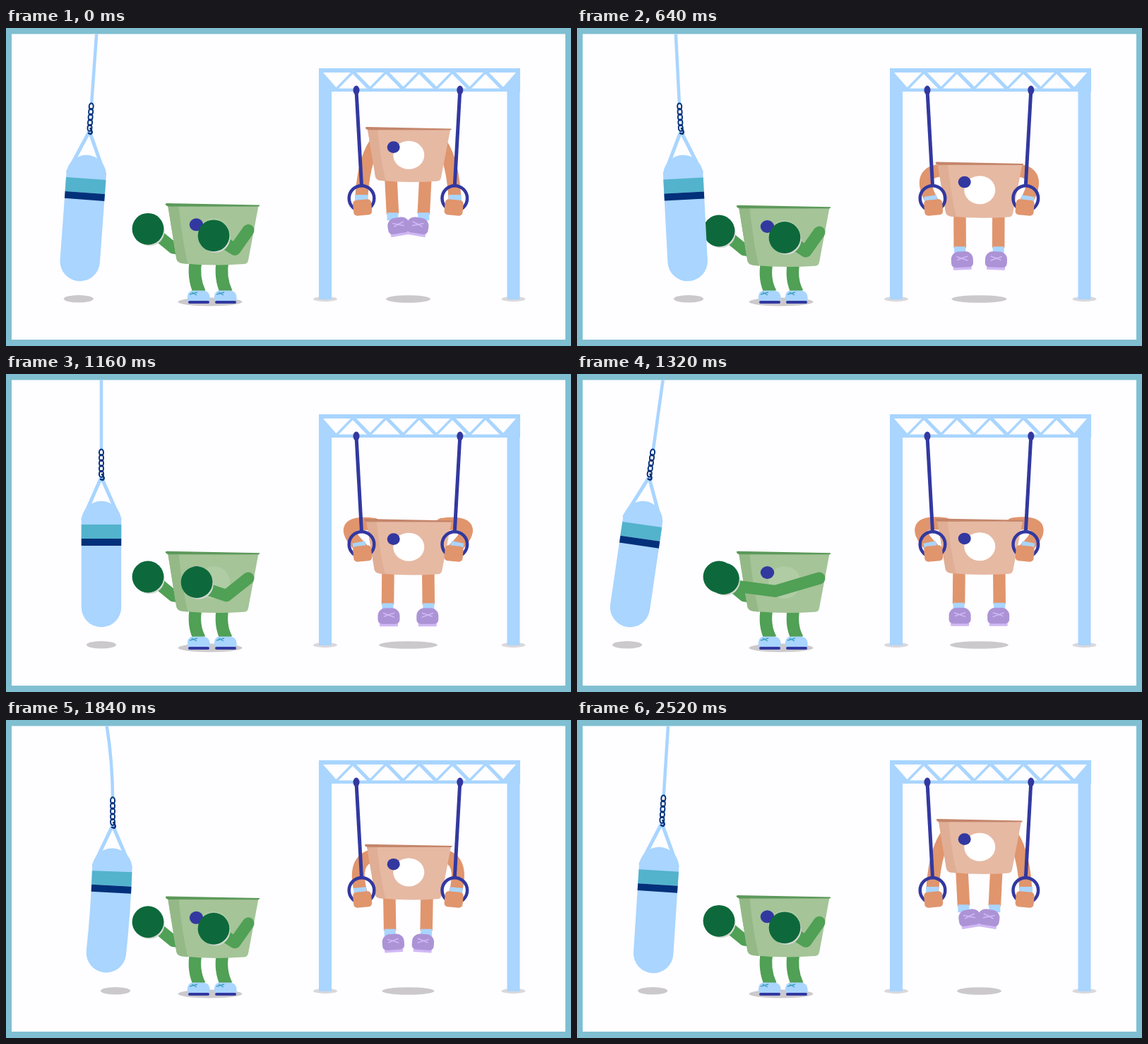
These frames come from a looping animation (800 by 450 pixels, 2.56 s). An HTML page with a canvas:

```html
<!DOCTYPE html>
<html lang="en">
<head>
<meta charset="utf-8">
<title>Workout</title>
<style>
html, body { margin: 0; height: 100%; overflow: hidden; background: #7fbfd1; }
canvas { display: block; }
</style>
</head>
<body>
<canvas id="stage" width="800" height="450"></canvas>
<script>
const ctx = document.getElementById('stage').getContext('2d');
const LOOP = 2560;
const SKY = '#a9d5ff', NAVY = '#03307a', INDIGO = '#3238a0', SHADOW = '#cbc9cc';
const GREEN = '#50a055', ORANGE = '#e0956d';

const POT = new Path2D('M-58 2L59 3L46 72Q45 77 40 77Q0 80-40 76Q-46 75-47 70Z');
const POT_SHADE = new Path2D('M-58 2L-44 2Q-39 50-32 77L-40 76Q-46 75-47 70Z');
const POT_RIM = new Path2D('M-61 0Q-61-1.2-59-1.2L60 1.2Q62 2 59 3.2L-57 3Q-61 2-61 0Z');

function ease(x) {
  return (1 - Math.cos(Math.PI * Math.min(1, Math.max(0, x)))) / 2;
}

// Rises 0 to 1 from start to top, holds until leave, falls back to 0 at end.
function pulse(t, start, top, leave, end) {
  return ease((t - start) / (top - start)) * ease((end - t) / (end - leave));
}

function fill(color, path) { ctx.fillStyle = color; ctx.fill(path); }

function oval(color, x, y, rx, ry = rx) {
  ctx.beginPath();
  ctx.ellipse(x, y, rx, ry, 0, 0, 7);
  ctx.fillStyle = color;
  ctx.fill();
}

function box(color, x, y, w, h, r = 0) {
  ctx.beginPath();
  ctx.roundRect(x, y, w, h, r);
  ctx.fillStyle = color;
  ctx.fill();
}

function stroke(color, width, d, cap = 'butt') {
  ctx.strokeStyle = color;
  ctx.lineWidth = width;
  ctx.lineCap = cap;
  ctx.lineJoin = 'round';
  ctx.stroke(new Path2D(d));
}

function place(x, y, angle, sx, sy, draw) {
  ctx.save();
  ctx.translate(x, y);
  ctx.rotate(angle);
  ctx.scale(sx, sy);
  draw();
  ctx.restore();
}

function pot(x, y, sx, sy, body, shade, rim) {
  place(x, y, 0, sx, sy, () => {
    fill(body, POT);
    fill(shade, POT_SHADE);
    fill(rim, POT_RIM);
  });
}

function glove(x, y) {
  oval('#d3d8d4', x + 2.5, y + 3, 21);
  oval('#0d693b', x, y, 22.4);
}

// swing: sideways pendulum; whip: slack rope rebound; wag: late flick of the lower end.
function punchBag(swing, whip, wag) {
  const hang = y => 135 + swing * (y + 85) / 192;
  const angle = Math.atan(-swing / 192);
  const top = hang(8) + 31 * whip, chain = hang(107) + 65 * whip, cy = 107 + 12 * whip;
  const ax = hang(208) + 62 * whip - 5 * wag, ay = 208 + 7 * whip;
  const bx = hang(330) + 28 * whip + 8 * wag, by = 330 - 3 * whip;
  const hookX = chain - Math.sin(angle) * 39, hookY = cy + 39;
  stroke(SKY, 4.5, `M${top} 8Q${(top + chain) / 2 + 16 * whip + 2 * wag} ${(8 + cy) / 2} ${chain} ${cy + 2}`);

  const tilt = Math.atan2(ax - bx, by - ay) * (1 - whip / 2);
  const dx = 26 * Math.cos(tilt), dy = 26 * Math.sin(tilt);
  stroke(SKY, 5, `M${ax - dx} ${ay - 3 - dy}L${hookX} ${hookY}L${ax + dx} ${ay - 3 + dy}`, 'round');

  const core = `M${ax} ${ay}Q${(ax + bx) / 2 + 9 * whip - 6 * wag} ${(ay + by) / 2} ${bx} ${by}`;
  const band = 5 - 2 * whip;
  stroke(SKY, 56.5, core, 'round');
  ctx.setLineDash([0, band, 20, 999]);
  stroke('#53b3cc', 56.5, core);
  ctx.setLineDash([0, band + 20, 10, 999]);
  stroke(NAVY, 56.5, core);
  ctx.setLineDash([]);

  place(chain, cy, angle, 1, 1, () => {
    for (let i = 0; i < 5; i++) {
      ctx.beginPath();
      ctx.ellipse(0, 4 + i * 7.6, 3, 4.6, 0, 0, 7);
      ctx.lineWidth = 2;
      ctx.strokeStyle = NAVY;
      ctx.stroke();
    }
    stroke(NAVY, 2.4, 'M1 35Q6 41 2 43L-1 42', 'round');
  });
}

function sneaker(x) {
  box(SKY, x, 371.5, 31.5, 15, [8, 9, 2, 2]);
  box(INDIGO, x + 1, 386, 30, 4, 2);
  stroke('#3f9fc0', 1.4, `M${x + 3} 377L${x + 14} 374M${x + 6} 374L${x + 13} 378`);
}

function boxerBack(y, jab) {
  const gx = 201 - jab;
  oval(SHADOW, 289, 387.5, 45.5, 6);
  stroke(GREEN, 16.5, `M${gx + 14} ${y + 44}L${237 - jab * .4} ${y + 62}L252 ${y + 64}`, 'round');
  glove(gx, y + 35);
  for (const x of [269, 307]) {
    stroke(GREEN, 17.5, `M${x} ${y + 78}Q${x - 5} ${y + 104} ${x + 5.5} 375`);
  }
  sneaker(257);
  sneaker(295);
  pot(292.7, y, 1.095, 1.1, '#a5c498', '#94b987', '#5c995a');
  oval('#b0cca4', 294, y + 43, 23);
  oval(INDIGO, 269.5, y + 29, 9.7, 9);
}

function boxerFront(y, cross) {
  const gx = 294 - cross, gy = y + 44.5 - cross * .08;
  stroke(GREEN, 17, `M343 ${y + 37}L${324 - cross * .5} ${y + 64 - cross * .1}L${gx + 15} ${gy + 10}`, 'round');
  glove(gx, gy);
}

function mirrored(draw) {
  draw();
  place(1138.8, 0, 0, -1, 1, draw);
}

function rig() {
  for (const x of [452, 718.5]) {
    oval('#d9d8dc', x, 383.5, 17, 3.7);
    box(SKY, x - 9, 86, 18, 298);
  }
  box(SKY, 443, 57, 285, 6);
  box(SKY, 443, 85.5, 285, 4.5);
  fill(SKY, new Path2D('M443 57L449 63L470 87L443 87ZM728 57L722 63L701 87L728 87Z'));
  for (let i = 0; i < 10; i++) {
    const x = 468 + i * 23.5, down = i % 2;
    stroke(SKY, down ? 5 : 3.5, `M${x} ${down ? 62 : 86}L${x + 23.5} ${down ? 86 : 62}`);
  }
}

function ringShoe(x, y, angle) {
  place(x, y, angle, 1, 1, () => {
    box('#d0b8f5', -13, 19, 26, 7, 1);
    box('#ac93d6', -15.5, 0, 31, 22.5, [11, 11, 6, 6]);
    stroke('#d0b8f5', 1.5, 'M-8 7Q0 10 8 13M-7 12Q0 9 8 7');
  });
}

function gymnast(dip) {
  const y = 141.3 + 65 * dip, bow = dip ** 1.5;
  oval(SHADOW, 569.5, 383.5, 31.5 + 10 * dip, 5.3);
  mirrored(() => {
    const shoeX = 554 - 12 * dip, shoeY = y + 127 - 2 * dip, ankle = 547.5 - 7 * dip;
    stroke(ORANGE, 17.5, `M${545 - 4 * dip} ${y + 72}L${ankle} ${shoeY - 5}`);
    box(SKY, ankle - 8, shoeY - 7, 16, 11);
    ringShoe(shoeX, shoeY, -.16 * (1 - dip));
    stroke(ORANGE, 18, `M522 ${165 + 48 * dip}C${512 - 32 * bow} ${180 + 27 * dip} ${505 - 27 * bow} ${205 + 17 * dip} 503 246`, 'round');
    place(503 - 3 * dip, 240 + 2 * dip, -.2 * dip, 1, 1, () => box(SKY, -9, -4, 18, 9));
  });
  pot(570, y, 1 + .03 * dip, .98 + .02 * dip, '#e6b9a3', '#dfae95', '#c4856a');
  oval('#ffffff', 570.3, y + 38.5, 22, 20);
  oval(INDIGO, 548.7, y + 27.3, 9, 8.3);
  mirrored(() => {
    stroke(INDIGO, 5, 'M496 88L503.5 223');
    oval(INDIGO, 496, 88, 4.5, 6.5);
    ctx.beginPath();
    ctx.arc(503.5, 241, 17.8, 0, 7);
    ctx.lineWidth = 4.5;
    ctx.stroke();
    place(504.7, 254, -.09, 1, 1, () => box(ORANGE, -13, -11, 26, 22, 5));
  });
}

function draw(now) {
  const t = now % LOOP;
  const dip = pulse(t, 0, 950, 1240, 2520);
  const jab = 38 * pulse(t, 640, 740, 740, 880);
  const cross = 125 * pulse(t, 1125, 1250, 1250, 1440);
  const swing = -14 + 24 * pulse(t, 0, 640, 640, 900) + 14 * pulse(t, 900, 1160, 1160, 1310)
    - 14 * pulse(t, 1160, 1310, 1310, 1520) + 14 * pulse(t, 1310, 1520, 2240, 2600);
  const whip = pulse(t, 1310, 1520, 1520, 2000);
  const wag = pulse(t, 1850, 2240, 2240, 2500);
  const drift = 20 * pulse(t, 1310, 1600, 2240, 2560);
  const potY = 249.3 + 2.7 * pulse(t, 0, 500, 1520, 2200);

  ctx.fillStyle = '#7fbfd1';
  ctx.fillRect(0, 0, 800, 450);
  ctx.save();
  ctx.beginPath();
  ctx.rect(8, 8.5, 784, 432.5);
  ctx.clip();
  ctx.fillStyle = '#fefdff';
  ctx.fillRect(0, 0, 800, 450);
  rig();
  gymnast(dip);
  oval(SHADOW, 135 + 2.3 * swing + drift, 383.3, 21, 5.3);
  boxerBack(potY, jab);
  punchBag(swing, whip, wag);
  boxerFront(potY, cross);
  ctx.restore();
}

const start = performance.now();
function tick() {
  draw(performance.now() - start);
  requestAnimationFrame(tick);
}
tick();
</script>
</body>
</html>
```
